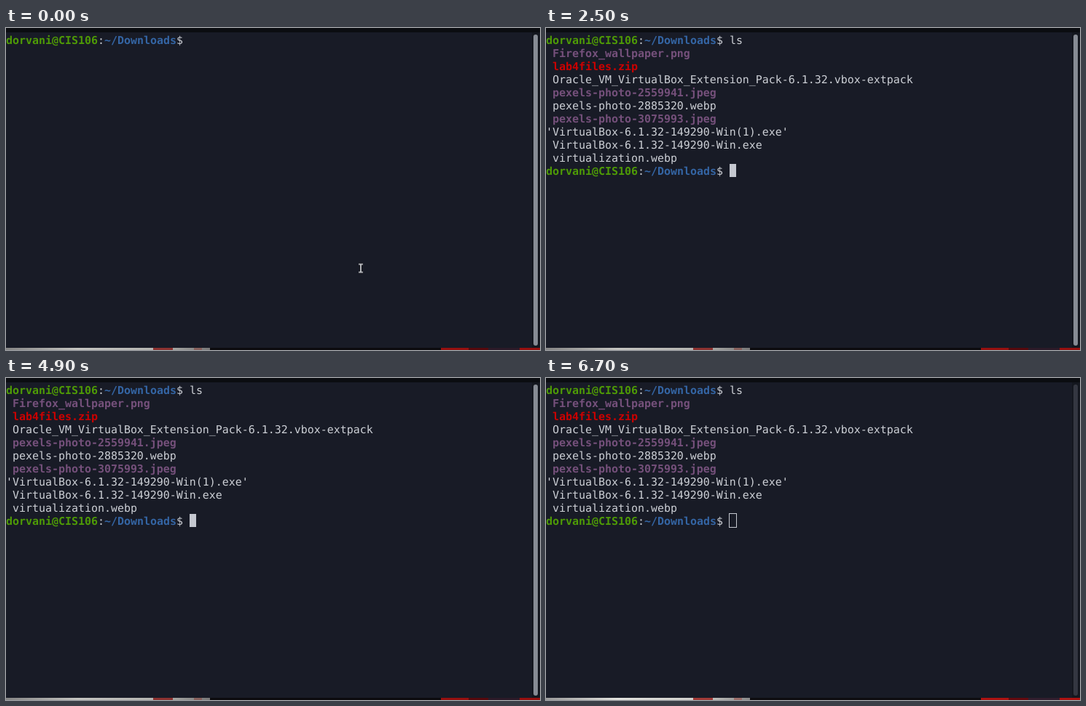
An HTML page for the animation above (6.8 s loop, 733 by 443 pixels).

```html
<!DOCTYPE html>
<html lang="en">
<head>
<meta charset="utf-8">
<title>Terminal: listing a directory</title>
<style>
  html, body { margin: 0; width: 100%; height: 100%; overflow: hidden; background: #181b26; }
  svg { display: block; width: 733px; height: 443px; }
  text {
    font: 14.95px "DejaVu Sans Mono", monospace;
    text-rendering: geometricPrecision;
    white-space: pre;
    fill: #cdd0d6;
  }
  .user, .path, .image, .archive { font-weight: bold; }
  .user { fill: #4e9a06; }
  .path { fill: #3465a4; }
  .image { fill: #75507b; }
  .archive { fill: #cc0000; }
</style>
</head>
<body>
<svg viewBox="0 0 733 443">
  <defs>
    <linearGradient id="paper">
      <stop offset="0" stop-color="#858585"/>
      <stop offset=".35" stop-color="#c4c4c0"/>
      <stop offset=".75" stop-color="#b4b4b0"/>
      <stop offset="1" stop-color="#777"/>
    </linearGradient>
  </defs>
  <rect width="733" height="443" fill="#181b26"/>
  <rect width="733" height="6" fill="#0b0d11"/>
  <rect x="722" y="6" width="11" height="434" fill="#14171f"/>
  <rect id="scrollbar" x="724" y="9" width="6" height="428" rx="3" fill="#868b94"/>

  <g id="edge">
    <rect y="440" width="733" height="3" fill="#0c0b0e"/>
    <rect y="440" width="280" height="3" fill="url(#paper)"/>
    <path d="M202 441.5h27" stroke="#8c3230" stroke-width="3"/>
    <path d="M258 441.5h11" stroke="#86605c" stroke-width="3"/>
    <path d="M597 441.5h38M705 441.5h28" stroke="#96100f" stroke-width="3"/>
    <path d="M635 441.5h27" stroke="#55090d" stroke-width="3"/>
    <path d="M662 441.5h43" stroke="#2b1a28" stroke-width="3"/>
  </g>

  <g id="screen"></g>
  <rect id="cursor" width="9" height="18" fill="#c5c8d0"/>
  <rect id="hollow" x="251.5" y="186.5" width="10" height="19" fill="none" stroke="#c5c8d0"/>
  <g id="pointer" fill="none">
    <path d="M-3 -5.5H3M0 -5.5V5.5M-3 5.5H3" stroke="#101218" stroke-width="4"/>
    <path d="M-3 -5.5H3M0 -5.5V5.5M-3 5.5H3" stroke="#d8dade" stroke-width="1.6"/>
  </g>
</svg>
<script>
const LOOP = 6800, CELL = 9, LINE = 18, TOP = 7, BASELINE = 15;
const byId = id => document.getElementById(id);

function make(tag, parent, attrs = {}) {
  const el = document.createElementNS('http://www.w3.org/2000/svg', tag);
  for (const name in attrs) el.setAttribute(name, attrs[name]);
  return parent.appendChild(el);
}

function write(parent, row, col, string, kind = 'plain') {
  const el = make('text', parent, { x: col * CELL, y: TOP + row * LINE + BASELINE, class: kind });
  el.textContent = string;
}

function prompt(parent, row) {
  write(parent, row, 0, 'dorvani@CIS106', 'user');
  write(parent, row, 14, ':');
  write(parent, row, 15, '~/Downloads', 'path');
  write(parent, row, 26, '$');
}

// Each step is [time in ms, styles], held until the next one.
function play(el, steps) {
  const frames = steps.map(([time, style]) => ({ ...style, offset: time / LOOP, easing: 'step-end' }));
  frames.push({ ...steps[steps.length - 1][1], offset: 1 });
  el.animate(frames, { duration: LOOP, iterations: Infinity });
}

const show = { opacity: 1 }, hide = { opacity: 0 };
const at = (x, y, opacity = 1) => ({ opacity, transform: `translate(${x}px, ${y}px)` });
const cell = (col, row, opacity) => at(col * CELL, TOP + row * LINE, opacity);

const screen = byId('screen');
prompt(screen, 0);

const command = make('g', screen);
write(command, 0, 28, 'ls');

const listing = make('g', screen);
[
  ['Firefox_wallpaper.png', 'image'],
  ['lab4files.zip', 'archive'],
  ['Oracle_VM_VirtualBox_Extension_Pack-6.1.32.vbox-extpack'],
  ['pexels-photo-2559941.jpeg', 'image'],
  ['pexels-photo-2885320.webp'],
  ['pexels-photo-3075993.jpeg', 'image'],
  ["'VirtualBox-6.1.32-149290-Win(1).exe'"],
  ['VirtualBox-6.1.32-149290-Win.exe'],
  ['virtualization.webp']
].forEach(([name, kind], i) => write(listing, i + 1, name[0] === "'" ? 0 : 1, name, kind));
prompt(listing, 10);

play(command, [[0, hide], [1400, show]]);
play(listing, [[0, hide], [2500, show]]);

play(byId('cursor'), [
  [0, cell(28, 0, 0)], [400, cell(28, 0, 1)], [1000, cell(28, 0, 0)], [1200, cell(28, 0, 1)],
  [1400, cell(30, 0, 1)], [1900, cell(30, 0, 0)], [2100, cell(30, 0, 1)],
  ...[2500, 2700, 3300, 3900, 4500, 5100, 5700, 6400].map((time, i) => [time, cell(28, 10, 1 - i % 2)])
]);
play(byId('hollow'), [[0, hide], [6600, show]]);

const track = (start, points) => points.map(([x, y], i) => [start + i * 100, at(x, y)]);
play(byId('pointer'), [
  [0, at(487, 330.5)],
  [1200, at(487, 330.5, 0)],
  ...track(4200, [[478, 222], [464, 250], [449, 279], [431, 308], [412, 337], [393, 365], [374, 392.5]]),
  [4900, at(374, 392.5, 0)],
  ...track(5300, [[150, 220.5], [125, 173], [105, 131.5], [91, 97], [79, 68],
    [72, 49.5], [84, 51.5], [75, 38], [61, 21.5]]),
  [6200, at(61, 21.5, 0)]
]);

play(byId('scrollbar'), [[0, { fill: '#868b94' }], [6600, { fill: '#5c6069' }], [6700, { fill: '#343741' }]]);
play(byId('edge'), [[0, { filter: 'none' }], [6700, { filter: 'brightness(1.15)' }]]);
</script>
</body>
</html>
```
